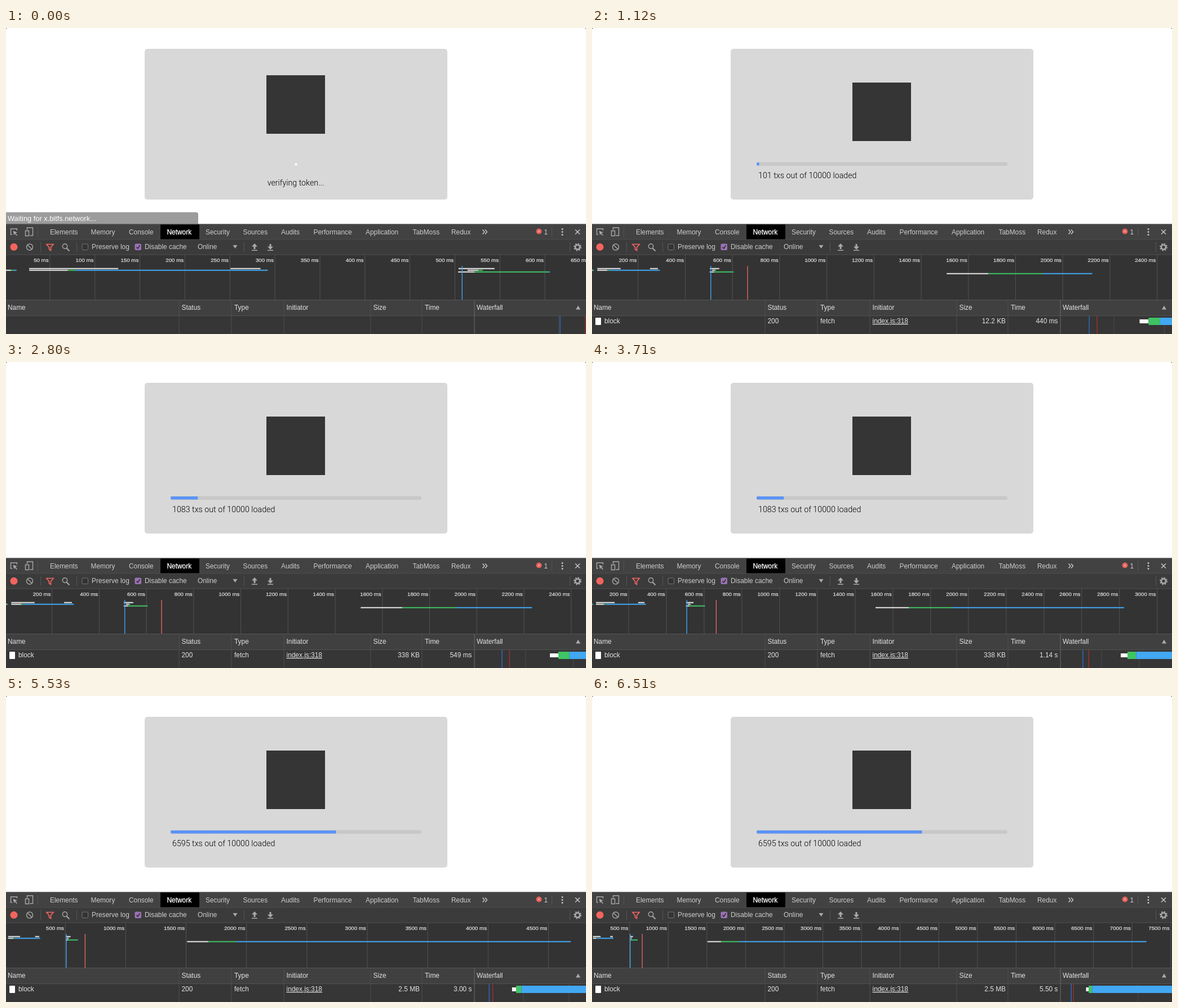
Recreate the animation shown at these times as an HTML page. Size 1029x544 px, loop 6.58 s.

```html
<!DOCTYPE html>
<html lang="en">
<head>
<meta charset="utf-8">
<title>Loading transactions</title>
<style>
  html, body { margin: 0; width: 100%; height: 100%; overflow: hidden; background: #fff; }
  svg { display: block; width: 1029px; height: 544px; }
  text { font: 11.9px "Liberation Sans", Arial, sans-serif; fill: #cdcdcd; white-space: pre; }
  .tick { font-size: 9.7px; fill: #e6e6e6; stroke: #e6e6e6; stroke-width: .2px; text-anchor: end; }
  .cell { fill: #e2e2e2; }
  .end { text-anchor: end; }
  .dim { fill: #8d8d8d; }
  .link { text-decoration: underline; }
  .app { font: 300 14.25px Roboto, sans-serif; fill: #000; }
  .mid { text-anchor: middle; }
  .bubble text { font-size: 12.8px; fill: #fff; }
  .on { fill: #fff; stroke: #fff; stroke-width: .3px; }
  .icon { fill: none; stroke: #a9a9a9; stroke-width: 1.4; }
</style>
</head>
<body>
<svg viewBox="0 0 1029 544">
  <defs>
    <clipPath id="track"><rect x="292" y="238.5" width="445" height="6.5" rx="3.2"/></clipPath>
    <clipPath id="fall"><rect x="832" y="512" width="197" height="32"/></clipPath>
  </defs>

  <path d="M0 0h2L0 2zM1029 0h-2l2 2z" fill="#666"/>
  <rect x="246" y="37" width="537" height="268" rx="5" fill="#d8d8d8"/>
  <g id="page"></g>

  <!-- panel backgrounds -->
  <rect y="348.5" width="1029" height="28" fill="#424242"/>
  <rect y="348.5" width="1029" height="1" fill="#555"/>
  <rect y="376" width="1029" height="27" fill="#3b3b3b"/>
  <rect y="375.5" width="1029" height="1" fill="#4d4d4d"/>
  <rect y="403" width="1029" height="81" fill="#333"/>
  <rect y="402.5" width="1029" height="1" fill="#505050"/>
  <rect y="484" width="1029" height="27.5" fill="#404040"/>
  <rect y="483" width="1029" height="1" fill="#555"/>
  <rect y="511.5" width="1029" height="33" fill="#363636"/>
  <rect y="511" width="1029" height="1" fill="#515151"/>
  <rect x="274" y="349.5" width="69" height="26" fill="#000"/>

  <!-- tab bar icons -->
  <g class="icon">
    <path d="M11 367H8.5V357H19.500V360"/>
    <path d="M12.500 360.500l7.500 3-3.200 1.200 3.200 3.500-1.200 1-3.200-3.500-1.300 2.600z" fill="#a9a9a9" stroke="none"/>
    <path d="M37.500 359v-4h10v14h-5M34.500 360.500h6v9h-6z"/>
    <path d="M56.500 354v17M968.500 354v17" stroke="#555" stroke-width="1"/>
    <path d="M845.500 358.500l3.500 4-3.500 4M850 358.500l3.500 4-3.500 4M1010 358.500l8 8M1018 358.500l-8 8" stroke="#ccc"/>
  </g>
  <g fill="#c4c4c4"><circle cx="987" cy="357.500" r="1.500"/><circle cx="987" cy="362.500" r="1.500"/><circle cx="987" cy="367.500" r="1.500"/></g>
  <circle cx="945.500" cy="361.500" r="5" fill="#e5605a"/>
  <path d="M943.700 359.700l3.600 3.600M947.300 359.700l-3.600 3.600" stroke="#f4d0ce" stroke-width="1"/>

  <!-- toolbar icons -->
  <circle cx="14" cy="389.300" r="6.500" fill="#f2655f"/>
  <g class="icon">
    <circle cx="42" cy="389.500" r="5.500"/><path d="M38 385.500l8 8"/>
    <path d="M61.500 381v17M125.500 381v17M422.500 381v17M1000.500 381v17" stroke="#555" stroke-width="1"/>
    <path d="M72 384.500h12l-4.500 5.500v5.500l-3-2V390z" stroke="#f2655f" stroke-width="1.700"/>
    <circle cx="104.500" cy="388" r="4.200"/><path d="M107.500 391.500l5 5" stroke-width="2"/>
    <rect x="135" y="384" width="10.500" height="10.500" rx="2" stroke="#777" stroke-width="1" fill="#333"/>
    <path d="M441 393v-7M469 384v7" stroke-width="3"/>
    <path d="M436 395.200h10M464 395.200h10" stroke-width="1.500"/>
    <circle cx="1014" cy="389.500" r="4" stroke-width="2.600"/>
    <circle cx="1014" cy="389.500" r="6" stroke-width="2" stroke-dasharray="2.350 2.350"/>
  </g>
  <rect x="228.500" y="383.500" width="11.500" height="11.500" rx="2" fill="#9a72b5"/>
  <path d="M231.500 389.500l2.200 2.500 3.800-5.500" fill="none" stroke="#2b2b2b" stroke-width="1.500"/>
  <path d="M402.500 386h8l-4 6zM436 388.500h10l-5-5.500zM464 388.500h10l-5 5.500zM1011 500.500h8l-4-7z" fill="#a9a9a9"/>

  <g id="labels"></g>
  <g id="dyn"></g>
</svg>

<script>
const LOOP = 6580, STEP = 70;
const WHITE = '#e6e6e6', GREEN = '#3fc463', BLUE = '#42a8f2', RED = '#ef6a61';
const READY = 508, LOADED = 664;                  // page events, ms
const QUEUED = 1508, SENT = 1685, REPLY = 1914;   // phases of the block request

const el = id => document.getElementById(id);
const text = (x, y, s, cls = '') => `<text x="${x}" y="${y}" class="${cls}">${s}</text>`;
const rect = (x, y, w, h, fill, more = '') =>
  `<rect x="${x}" y="${y}" width="${Math.max(0, w)}" height="${h}" fill="${fill}" ${more}/>`;

// [stage time, network time]
const clock = [[0, 660], [490, 660], [560, 1513], [840, 1513], [910, 1914], [1120, 2125],
  [2240, 2125], [2310, 2234], [3640, 2234], [3710, 2825], [4620, 3735], [5530, 4685],
  [5600, 6275], [6510, 7185]];

function netTime(t) {
  const i = clock.findIndex(k => k[0] >= t);
  if (i < 1) return clock[0][1];
  const [a, b] = [clock[i - 1], clock[i]];
  return a[1] + (b[1] - a[1]) * (t - a[0]) / (b[0] - a[0]);
}

// smallest 1-2-5 step at least 60px wide
function gridStep(scale) {
  for (let p = 10; ; p *= 10)
    for (const m of [1, 2, 5]) if (p * m * scale >= 60) return p * m;
}

// earlier requests: row, start, then pairs of colour and end time
const requests = [
  [1, 0, WHITE, 7, GREEN, 10, BLUE, 13],
  [0, 27, WHITE, 126],
  [1, 27, WHITE, 70, GREEN, 79, BLUE, 292],
  [0, 250.6, WHITE, 284],
  [0, 504, WHITE, 544],
  [1, 514, WHITE, 526, GREEN, 531],
  [2, 503.5, WHITE, 522, GREEN, 604, BLUE, 605.5]
];

function overview(end, list) {
  let span = 7516;
  while (span / 1.25 * .975 >= end) span /= 1.25;
  const scale = 1031 / span, X = ms => ms * scale - 2, step = gridStep(scale);
  let out = '';
  for (let ms = step; X(ms) < 1075; ms += step) {
    out += rect(X(ms) - .5, 403, 1, 80, '#525252') + text(X(ms) - 2.3, 416, ms + ' ms', 'tick');
  }
  for (const [row, start, ...parts] of list) {
    let from = start;
    for (let i = 0; i < parts.length; i += 2) {
      out += rect(X(from), 426.7 + row * 3, (parts[i + 1] - from) * scale, 2, parts[i]);
      from = parts[i + 1];
    }
  }
  return out + rect(X(READY) - .7, 423, 1.5, 60, '#3f9be8') + rect(X(LOADED) - .6, 423, 1.3, 60, RED);
}

function waterfall(end, active) {
  const scale = 190 / end, X = ms => 836.7 + ms * scale, step = gridStep(scale);
  let out = '';
  for (let ms = step; X(ms) < 1029; ms += step) out += rect(X(ms) - .5, 512, 1, 32, '#4a4a4a');
  out += rect(X(READY) - .7, 512, 1.5, 32, '#3168bd') + rect(X(LOADED) - .7, 512, 1.4, 32, '#a0302d');
  if (active) {
    out += rect(X(QUEUED), 518, (SENT - QUEUED) * scale, 7, '#fff')
      + rect(X(SENT), 515, (REPLY - SENT) * scale, 13, GREEN)
      + rect(X(REPLY), 515, 1029 - X(REPLY), 13, BLUE);
  }
  return `<g clip-path="url(#fall)">${out}</g>`;
}

function row(t, net) {
  const ok = t >= 910, took = net - SENT;
  const size = !ok ? '0 B' : t < 2310 ? '12.2 KB' : t < 5110 ? '338 KB' : '2.5 MB';
  const time = !ok ? 'Pending' : took < 1000 ? Math.round(took) + ' ms' : (took / 1000).toFixed(2) + ' s';
  return rect(6, 515, 10, 13, '#fff', 'rx="1"')
    + text(22, 525, 'block', 'cell')
    + text(311.5, 525, ok ? '200' : '(pending)', ok ? 'cell' : 'dim')
    + text(405, 525, 'fetch', 'cell')
    + text(497.5, 525, 'index.js:318', 'cell link')
    + text(734, 525, size, 'cell end')
    + text(826.5, 525, time, ok ? 'cell end' : 'dim end');
}

function page(t) {
  const verifying = t < 490;
  let out = rect(462, verifying ? 84 : 97, 104, 104, '#353535');
  if (verifying) {
    const p = (t + 130) / 1000;
    out += `<circle cx="514.5" cy="242.500" r="${18 * p}" fill="#fff" opacity="${1 - p}"/>`
      + text(514, 280, 'verifying token...', 'app mid');
    const fade = .5 * (1 - t / 280);
    if (fade > 0) out += `<g class="bubble" opacity="${fade}">`
      + '<path d="M0 327.500h337q4 0 4 4V349H0z" fill="#3b3b3b"/>'
      + text(3, 343, 'Waiting for x.bitfs.network...') + '</g>';
    return out;
  }
  const count = t < 1050 ? 0 : t < 2310 ? 101 : t < 5110 ? 1083 : 6595;
  return out + '<g clip-path="url(#track)">' + rect(292, 238, 445, 8, '#c8c8c8')
    + rect(292, 239, 445 * count / 10000, 5.5, '#5b93f5') + '</g>'
    + text(295, 267, count + ' txs out of 10000 loaded', 'app');
}

function labels() {
  const tabs = [[78, 'Elements'], [150.5, 'Memory'], [218, 'Console'], [285.5, 'Network'],
    [354, 'Security'], [420.5, 'Sources'], [488, 'Audits'], [545.5, 'Performance'],
    [638, 'Application'], [721.5, 'TabMoss'], [790, 'Redux'], [954.5, '1']];
  const tools = [[152, 'Preserve log'], [246, 'Disable cache'], [340, 'Online']];
  const heads = [[3, 'Name'], [311.5, 'Status'], [405, 'Type'], [497.5, 'Initiator'],
    [651.5, 'Size'], [743, 'Time'], [835, 'Waterfall']];
  const line = (list, y, cls) =>
    list.map(([x, s]) => text(x, y, s, s === 'Network' ? 'on' : cls)).join('');
  return line(tabs, 366.5, '') + line(tools, 393, '') + line(heads, 501, 'cell')
    + [307, 400, 493, 647, 738].map(x => rect(x - .5, 484, 1, 60, '#4f4f4f')).join('')
    + rect(830.5, 484, 1, 60, '#6a6a6a');
}

function draw(t) {
  const net = netTime(t), listed = t >= 560, active = t >= 910;
  const list = active ? [...requests, [3, QUEUED, WHITE, SENT, GREEN, REPLY, BLUE, net]] : requests;
  el('page').innerHTML = page(t);
  el('dyn').innerHTML = overview(active ? net : listed ? QUEUED : 605, list)
    + waterfall(net, active) + (listed ? row(t, net) : '');
}

el('labels').innerHTML = labels();
let last = -1;
const begin = performance.now();
function tick() {
  const t = Math.floor((performance.now() - begin) % LOOP / STEP) * STEP;
  if (t !== last) draw(last = t);
  requestAnimationFrame(tick);
}
tick();
</script>
</body>
</html>
```
